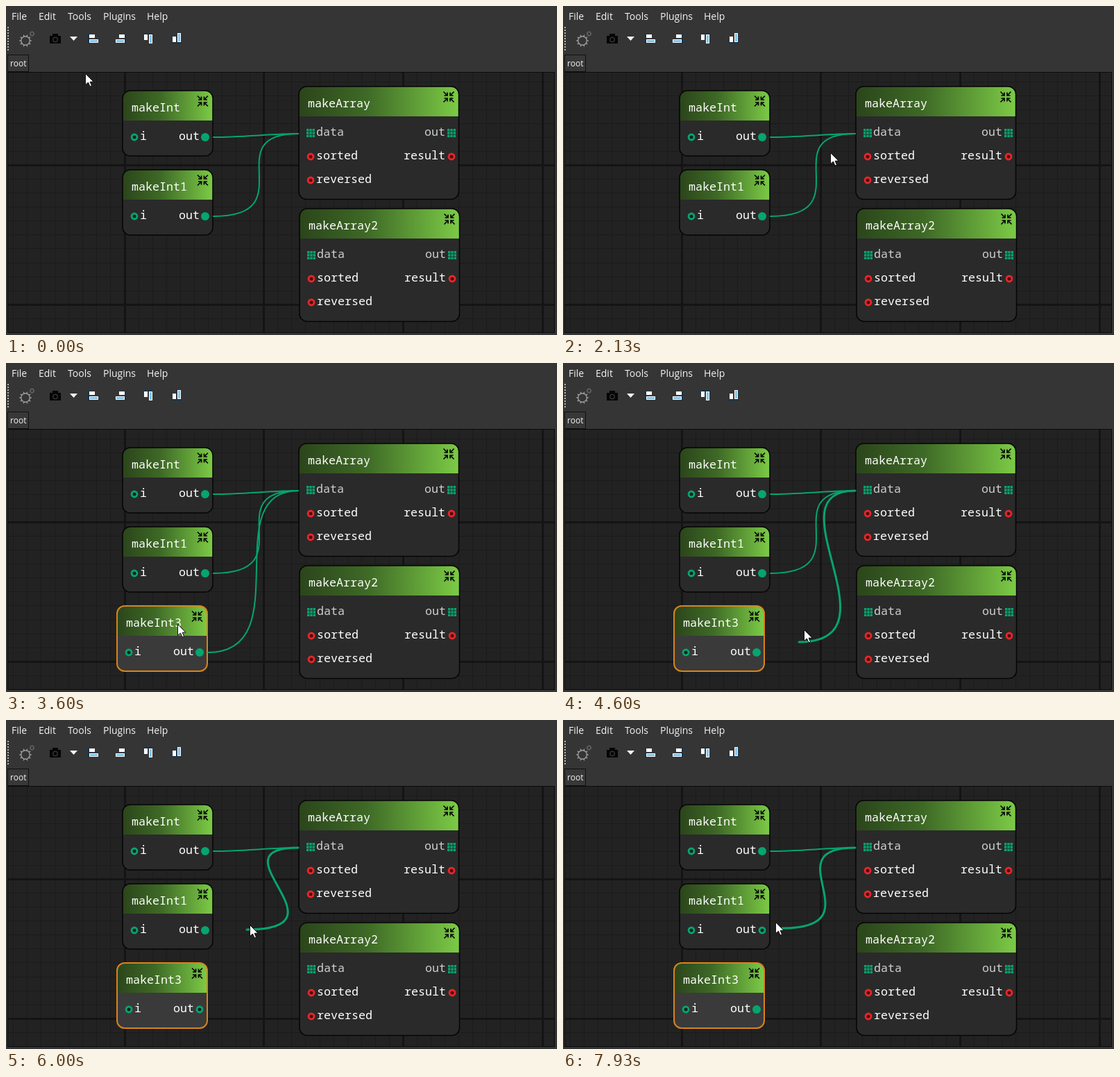
Write an HTML page with a canvas that moves like this. It is 794x474 px and loops after 8000 ms.

```html
<!DOCTYPE html>
<html lang="en">
<head>
<meta charset="utf-8">
<title>Node editor</title>
<style>
html, body { margin: 0; width: 100%; height: 100%; overflow: hidden; background: #353535; }
canvas { display: block; }
</style>
</head>
<body>
<canvas id="stage" width="794" height="474"></canvas>
<script>
const ctx = document.getElementById('stage').getContext('2d');
const GREEN = '#06a56e', RED = '#e8262a';
const LOOP = 8000, TICK = 1000 / 15;

// Moments of the story, in ticks.
const COPY = 41, PLACED = 54, PULL = 65, DROP = 83, PULL_BACK = 87, DROP_BACK = 100, PULL_AGAIN = 113;

// Hand movements: each eases from the previous spot, bending sideways.
// While a wire is pulled, its loose end sits at an offset from the pointer.
const HOME = { to: 0, x: 114, y: 97 };
const MOVES = [
  { from: 0, to: 5, x: 131, y: 139 },
  { from: 6, to: 19, x: 447, y: 200 },
  { from: 19, to: 27, x: 407, y: 176 },
  { from: 31, to: 35, x: 357, y: 256 },
  { from: 36, to: COPY, x: 256, y: 262 },
  { from: COPY, to: 46, x: 236, y: 331 },
  { from: 46, to: PLACED, x: 247, y: 376 },
  { from: 56, to: 63, x: 312, y: 406 },
  { from: PULL, to: 69, x: 347, y: 384, pull: [-7, 18] },
  { from: 69, to: DROP, x: 307, y: 296, bend: 40, pull: [-7, 18] },
  { from: PULL_BACK, to: 90, x: 351, y: 295, pull: [-4, 7] },
  { from: 90, to: DROP_BACK, x: 289, y: 402, bend: 30, pull: [-4, 7] },
  { from: 103, to: 107, x: 246, y: 396 },
  { from: 107, to: PULL_AGAIN, x: 305, y: 407 },
  { from: PULL_AGAIN, to: 119, x: 306, y: 291, bend: 40, pull: [10, 9] }
];

function handAt(t) {
  const i = MOVES.findLastIndex(m => m.from < t);
  if (i < 0) return HOME;
  const move = MOVES[i], start = MOVES[i - 1] || HOME;
  const k = Math.min(1, (t - move.from) / (move.to - move.from));
  const eased = 1 - (1 - k) ** 2;
  const bend = (move.bend || 0) * Math.sin(Math.PI * k);
  return {
    x: Math.round(start.x + (move.x - start.x) * eased + bend),
    y: Math.round(start.y + (move.y - start.y) * eased),
    pull: move.pull
  };
}

const within = (t, ...spans) => spans.some(([a, b]) => t >= a && t <= b);

function rect(x, y, w, h, color) {
  ctx.fillStyle = color;
  ctx.fillRect(x, y, w, h);
}

function disc(x, y, r, color) {
  ctx.fillStyle = color;
  ctx.beginPath();
  ctx.arc(x, y, r, 0, 7);
  ctx.fill();
}

function shape(points, color) {
  ctx.fillStyle = color;
  ctx.beginPath();
  points.forEach(p => ctx.lineTo(...p));
  ctx.closePath();
  ctx.fill();
}

function label(text, x, y, font, color, align = 'left') {
  ctx.font = font;
  ctx.fillStyle = color;
  ctx.textAlign = align;
  ctx.fillText(text, x, y);
}
const mono = (text, x, y, color = '#fff', align) =>
  label(text, x, y, '500 16.67px "Noto Sans Mono", monospace', color, align);

function gear(x, y, r, teeth, width, color) {
  ctx.strokeStyle = color;
  ctx.lineWidth = width;
  ctx.beginPath();
  ctx.arc(x, y, r, 0, 7);
  for (let i = 0; i < teeth; i++) {
    const a = i / teeth * 2 * Math.PI, c = Math.cos(a), s = Math.sin(a);
    ctx.moveTo(x + c * r, y + s * r);
    ctx.lineTo(x + c * r * 1.4, y + s * r * 1.4);
  }
  ctx.stroke();
}

// Alignment button: two bars resting against a line on one side.
function alignIcon(x, y, turned, flipped) {
  ctx.save();
  ctx.translate(x, y);
  if (flipped) ctx.scale(turned ? 1 : -1, turned ? -1 : 1);
  if (turned) ctx.transform(0, 1, 1, 0, 0, 0);
  rect(-8, -7, 2, 14, '#18344c');
  rect(-6, -6, 8, 5, '#fff');
  rect(-6, 1, 13, 5, '#fff');
  rect(-5, 2, 11, 3, '#7cc4ee');
  ctx.restore();
}

function drawGrid() {
  const cell = 20.07;
  for (const thick of [false, true]) {
    const width = thick ? 3 : 1, color = thick ? '#141414' : '#1b1b1b';
    for (let i = 0; i < 39; i++) {
      const x = Math.round(10 + i * cell), y = Math.round(108.6 + i * cell);
      if ((i % 10 === 8) === thick) rect(x - (width >> 1), 96, width, 374, color);
      if ((i % 10 === 6) === thick && y < 470) rect(3, y - (width >> 1), 787, width, color);
    }
  }
}

function drawChrome() {
  rect(0, 0, 794, 474, '#353535');
  const menu = { File: 8, Edit: 47, Tools: 89, Plugins: 140, Help: 203 };
  for (const name in menu) label(name, menu[name], 20, '14px "Open Sans", sans-serif', '#f4f4f4');

  for (let y = 30; y < 64; y += 4) rect(2, y, 2, 2, '#b4b4b4');
  gear(28, 50, 6.3, 10, 1.5, '#9a9a9a');
  gear(37.5, 40, 2.6, 8, 1, '#777');

  rect(63, 43, 16, 11, '#050505');
  rect(67, 40, 8, 4, '#050505');
  disc(71, 48.5, 3.8, '#444');
  disc(71, 48.5, 2.7, '#050505');
  shape([[92, 44], [103, 44], [97.5, 50]], '#f4f4f4');
  alignIcon(126, 47, false, false);
  alignIcon(165, 47, false, true);
  alignIcon(205, 47, true, false);
  alignIcon(246, 46, true, true);

  rect(2, 70, 31, 25, '#111');
  rect(3, 71, 29, 23, '#383838');
  label('root', 6, 87, '12px "Open Sans", sans-serif', '#f4f4f4');

  rect(2, 95, 789, 376, '#0c0c0c');
  rect(3, 96, 787, 374, '#222');
  drawGrid();
}

function ringPin(x, y, color, filled) {
  disc(x, y, filled ? 6 : 5.4, color);
  if (!filled) disc(x, y, 2.5, color === RED ? '#4a0c0c' : '#17231f');
}

function arrayPin(x, y) {
  for (let i = 0; i < 9; i++) {
    rect(x - 6 + i % 3 * 4.3, y - 6 + Math.floor(i / 3) * 4.3, 3.4, 3.4, GREEN);
  }
}

function collapseIcon(x, y) {
  ctx.strokeStyle = '#050505';
  ctx.lineWidth = 1.7;
  ctx.beginPath();
  for (const sx of [-1, 1]) for (const sy of [-1, 1]) {
    ctx.moveTo(x + sx * 7.5, y + sy * 7.5);
    ctx.lineTo(x + sx * 2, y + sy * 2);
    ctx.moveTo(x + sx * 2, y + sy * 6.5);
    ctx.lineTo(x + sx * 2, y + sy * 2);
    ctx.lineTo(x + sx * 6.5, y + sy * 2);
  }
  ctx.stroke();
}

function nodeFrame(title, x, y, w, h, selected) {
  const box = new Path2D();
  box.roundRect(x, y, w, h, 11);
  ctx.save();
  ctx.clip(box);
  rect(x, y, w, h, selected ? '#3a3a3a' : '#2a2a2a');
  const shade = ctx.createLinearGradient(x, 0, x + w, 0);
  shade.addColorStop(0, '#2b451b');
  shade.addColorStop(.42, '#3e6926');
  shade.addColorStop(1, '#7ccb46');
  rect(x, y, w, 43, shade);
  ctx.restore();
  ctx.strokeStyle = selected ? '#d8841c' : '#050505';
  ctx.lineWidth = selected ? 2 : 1.5;
  ctx.stroke(box);
  mono(title, x + 13, y + 30);
  collapseIcon(x + w - 14.5, y + 15);
}

function intNode(title, x, y, connected, selected) {
  nodeFrame(title, x, y, 130, 94, selected);
  ringPin(x + 17, y + 67, GREEN, false);
  ringPin(x + 119, y + 67, GREEN, connected);
  mono('i', x + 25, y + 71);
  mono('out', x + 111, y + 71, '#fff', 'right');
}

function arrayNode(title, x, y) {
  nodeFrame(title, x, y, 230.5, 162.5, false);
  const rows = [['data', 'out'], ['sorted', 'result'], ['reversed']];
  rows.forEach(([left, right], i) => {
    const color = i ? '#fff' : '#cfcfcf', py = y + 67 + i * 34;
    const pin = px => i ? ringPin(px, py, RED, false) : arrayPin(px, py);
    pin(x + 17);
    mono(left, x + 25, py + 4, color);
    if (right) {
      pin(x + 220);
      mono(right, x + 211, py + 4, color, 'right');
    }
  });
}

// All wires end at the data input of makeArray; flat ones bend less.
function wire(x, y, thick) {
  const endX = 421, endY = 184;
  const squeeze = Math.max(0, 119 - (endX - x));
  const reach = Math.min(1, Math.max(.3, Math.abs(y - endY) / 100));
  ctx.strokeStyle = GREEN;
  ctx.lineWidth = thick ? 3 : 2;
  ctx.lineCap = 'round';
  ctx.beginPath();
  ctx.moveTo(x, y);
  ctx.bezierCurveTo(x + (132 + squeeze * .45) * reach, y,
    endX - (119 + squeeze * .17) * reach, endY, endX, endY);
  ctx.stroke();
  ctx.lineCap = 'butt';
}

function drawPointer(x, y) {
  const arrow = [[0, 0], [0, 16], [4, 12.6], [6.5, 18.4], [9, 17.4], [6.6, 11.8], [11.5, 11.5]];
  shape(arrow.map(([dx, dy]) => [x + .5 + dx, y + .5 + dy]), '#fff');
  ctx.strokeStyle = '#111';
  ctx.lineWidth = 1;
  ctx.stroke();
}

function draw(t) {
  const hand = handAt(t);
  drawChrome();
  arrayNode('makeArray', 422, 116);
  arrayNode('makeArray2', 423, 292);
  intNode('makeInt', 168, 122, true);
  intNode('makeInt1', 168, 236, t < DROP_BACK);

  wire(299, 189, false);
  if (t <= PULL_BACK) wire(299, 303, within(t, [12, 13], [21, 22], [34, 36]));
  if (t > COPY) {
    const grip = handAt(Math.min(t, PLACED));
    const x = grip.x - 87, y = grip.y - 26;
    intNode('makeInt3', x, y, t < DROP || t >= DROP_BACK, true);
    if (t <= PULL || within(t, [DROP_BACK, PULL_AGAIN])) {
      wire(x + 131, y + 67, within(t, [62, PULL], [112, PULL_AGAIN]));
    }
  }
  const released = within(t, [DROP, PULL_BACK], [DROP_BACK, PULL_AGAIN]);
  if (hand.pull && !released) wire(hand.x + hand.pull[0], hand.y + hand.pull[1], true);
  drawPointer(hand.x, hand.y);
}

const start = performance.now();
function loop() {
  const ms = (performance.now() - start) % LOOP;
  draw(Math.floor((ms + 4) / TICK) % 120);
  requestAnimationFrame(loop);
}
loop();
</script>
</body>
</html>
```
